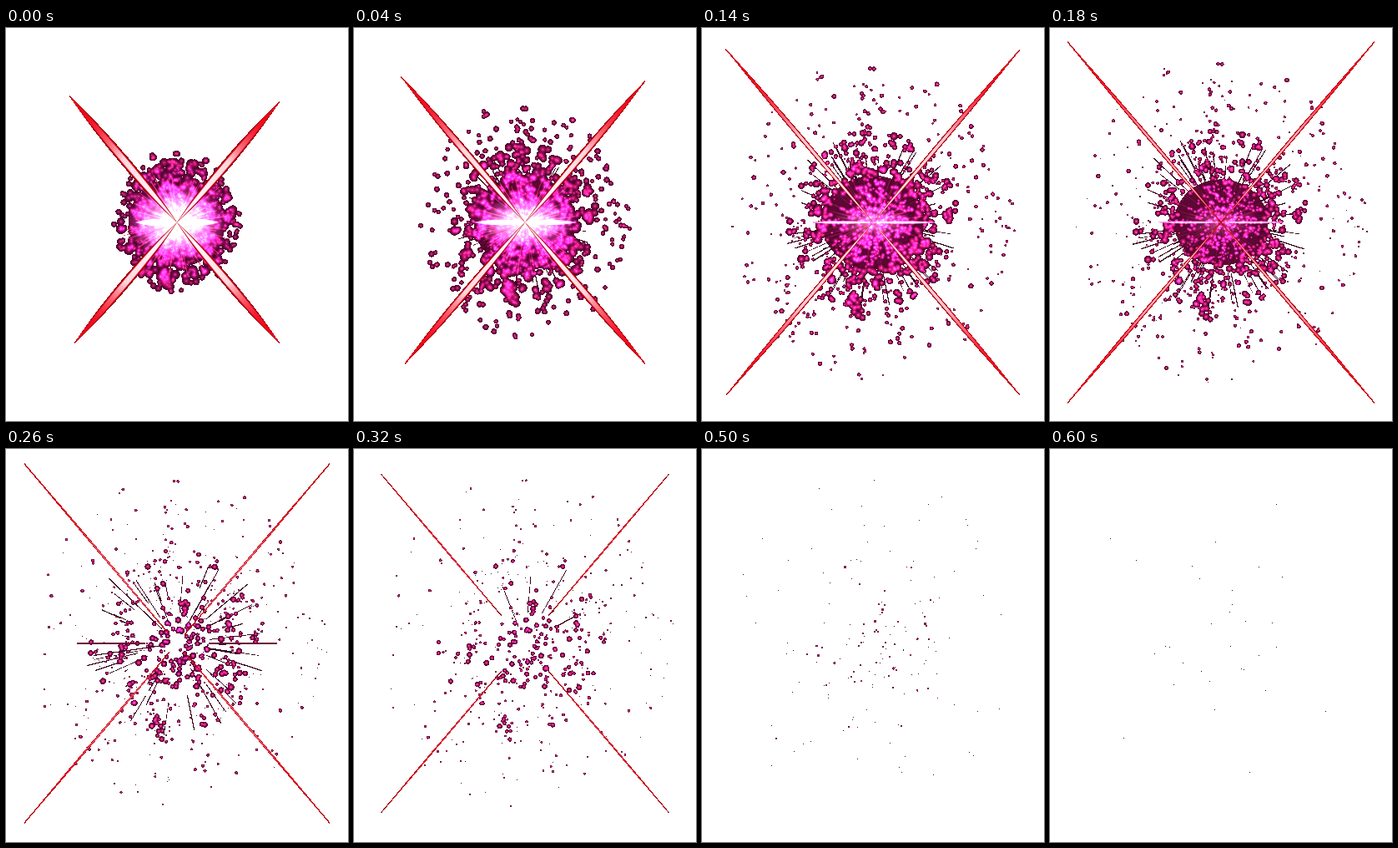
An HTML page with a canvas for the animation above (620 ms loop, 410 px wide and 471 px high).

```html
<!DOCTYPE html>
<html>
<head>
<meta charset="utf-8">
<style>
html, body { margin: 0; width: 100%; height: 100%; overflow: hidden; background: #fff; }
canvas { display: block; width: 410px; height: 471px; }
</style>
</head>
<body>
<canvas id="stage" width="410" height="471"></canvas>
<script>
const W = 410, H = 471, CX = 205, CY = 233, LOOP = 620, STEP = 20;
const ctx = document.getElementById('stage').getContext('2d', { willReadFrequently: true });

let seed = 20431;
function rnd() {
  seed = (seed + 0x6D2B79F5) | 0;
  let x = Math.imul(seed ^ (seed >>> 15), 1 | seed);
  x = (x + Math.imul(x ^ (x >>> 7), 61 | x)) ^ x;
  return ((x ^ (x >>> 14)) >>> 0) / 4294967296;
}
const range = (a, b) => a + (b - a) * rnd();
const clamp = v => Math.max(0, Math.min(1, v));

// Linear interpolation through [time, value] pairs
function track(keys, t) {
  if (t <= keys[0][0]) return keys[0][1];
  for (let i = 1; i < keys.length; i++) {
    const [t0, a] = keys[i - 1], [t1, b] = keys[i];
    if (t <= t1) return a + (b - a) * (t - t0) / (t1 - t0);
  }
  return keys[keys.length - 1][1];
}

function sprite(stops) {
  const c = document.createElement('canvas');
  c.width = c.height = 32;
  const g = c.getContext('2d');
  const grad = g.createRadialGradient(16, 16, 0, 16, 16, 16);
  stops.forEach(([p, col]) => grad.addColorStop(p, col));
  g.fillStyle = grad;
  g.beginPath();
  g.arc(16, 16, 16, 0, 7);
  g.fill();
  return c;
}
const disc = sprite([[0, '#580632'], [1, '#4a0428']]);
const cool = sprite([[0, 'rgba(255,95,190,1)'], [0.3, 'rgba(200,38,125,.7)'],
  [0.65, 'rgba(140,15,85,.4)'], [1, 'rgba(90,0,45,0)']]);
const hot = sprite([[0, 'rgba(255,150,245,1)'], [0.25, 'rgba(230,45,190,.7)'],
  [0.6, 'rgba(160,15,115,.32)'], [1, 'rgba(110,0,70,0)']]);

// Particles come in small clumps; lag is the share of the way still to go at the start
const parts = [];
function scatter(count, clump, o) {
  let made = 0;
  while (made < count) {
    const a = range(0, Math.PI * 2), r = o.radius();
    const n = Math.min(count - made, 1 + Math.floor(clump * rnd() * rnd()));
    for (let i = 0; i < n; i++) {
      const j = i ? 6 : 0;
      parts.push({
        x: Math.cos(a) * r * 0.93 + range(-j, j),
        y: Math.sin(a) * r * 1.03 + range(-j, j),
        size: o.size(), life: o.life(), power: o.power, lag: o.lag
      });
    }
    made += n;
  }
}
const longLife = () => 220 + 400 * rnd() ** 2;
scatter(300, 3, { radius: () => 76 * rnd() ** 0.7, size: () => range(9, 13),
  life: () => range(215, 262), power: 3, lag: 0.35 });
scatter(600, 5, { radius: () => 14 + 100 * rnd() ** 1.1, size: () => range(8, 12),
  life: longLife, power: 1.5, lag: 0.35 });
scatter(420, 2.6, { radius: () => 70 + 125 * rnd() ** 1.4, size: () => range(5.5, 8.5),
  life: longLife, power: 1, lag: 0.58 });

const rays = Array.from({ length: 90 }, () => ({
  a: range(0, Math.PI * 2), from: range(20, 80), to: range(60, 115),
  end: range(220, 330), w: range(0.5, 1.1)
}));

const spread = (t, lag) => 1 - lag * Math.exp(-t / 62);

function lens(x0, x1, half, fill) {
  const a = x0 + (x1 - x0) * 0.28, b = x0 + (x1 - x0) * 0.68, h = half * 1.33;
  ctx.fillStyle = fill;
  ctx.beginPath();
  ctx.moveTo(x0, 0);
  ctx.bezierCurveTo(a, -h, b, -h, x1, 0);
  ctx.bezierCurveTo(b, h, a, h, x0, 0);
  ctx.fill();
}

function line(x0, x1, width, color) {
  ctx.strokeStyle = color;
  ctx.lineWidth = width;
  ctx.beginPath();
  ctx.moveTo(x0, 0);
  ctx.lineTo(x1, 0);
  ctx.stroke();
}

function turned(angle, draw) {
  ctx.save();
  ctx.translate(CX, CY);
  ctx.rotate(angle);
  draw();
  ctx.restore();
}

function drawBase(t) {
  const r = track([[0, 58], [100, 66], [180, 56], [240, 0]], t);
  ctx.fillStyle = '#5c0834';
  ctx.beginPath();
  ctx.ellipse(CX, CY, r, r * 0.92, 0, 0, 7);
  ctx.fill();
  const k = spread(t, 0.5);
  for (const s of rays) {
    if (t < s.end) turned(s.a, () => line(s.from * k, s.to * k, s.w, '#3a0420'));
  }
}

function drawParts(t) {
  const live = [];
  for (const p of parts) {
    if (t >= p.life) continue;
    const k = spread(t, p.lag);
    const x = CX + p.x * k, y = CY + p.y * k;
    const d = p.size * (1 - (t / p.life) ** p.power);
    if (d < 2.6) {
      const s = Math.max(1, Math.round(d));
      ctx.fillStyle = `rgb(${50 + 32 * d},${8 + 8 * d},${30 + 20 * d})`;
      ctx.fillRect(Math.round(x), Math.round(y), s, s);
    } else {
      ctx.drawImage(disc, x - d / 2, y - d / 2, d, d);
      live.push([x, y, d * 0.94]);
    }
  }
  ctx.globalCompositeOperation = 'lighter';
  ctx.globalAlpha = 0.55 + 0.4 * clamp(t / 120);
  for (const [x, y, d] of live) {
    const near = Math.hypot(x - CX, y - CY) < 68 - t * 0.12;
    ctx.drawImage(near ? hot : cool, x - d / 2, y - d / 2, d, d);
  }
  ctx.globalAlpha = 1;
  ctx.globalCompositeOperation = 'source-over';
}

function drawCore(t) {
  ctx.globalCompositeOperation = 'lighter';
  const fade = clamp(1 - t / 240);
  for (const s of rays) {
    if (fade) turned(s.a, () => line(4, s.to * 0.6, s.w, `rgba(255,70,110,${0.5 * fade})`));
  }
  const power = track([[0, 1], [40, 0.85], [100, 0.4], [180, 0.15], [230, 0]], t);
  if (power > 0) {
    ctx.save();
    ctx.translate(CX, CY);
    ctx.scale(track([[0, 60], [40, 62], [100, 56], [180, 45]], t),
      track([[0, 46], [40, 32], [100, 24], [180, 22]], t));
    const g = ctx.createRadialGradient(0, 0, 0, 0, 0, 1);
    g.addColorStop(0, `rgba(255,255,255,${power})`);
    g.addColorStop(0.45, `rgba(255,220,255,${power * 0.7})`);
    g.addColorStop(1, 'rgba(255,100,255,0)');
    ctx.fillStyle = g;
    ctx.fillRect(-1, -1, 2, 2);
    ctx.restore();
  }
  ctx.globalCompositeOperation = 'source-over';
}

// Flat flare along the horizontal axis
function drawFlare(t) {
  const len = track([[0, 50], [40, 62], [100, 74], [180, 84], [260, 120]], t);
  const glow = track([[0, 1], [100, 0.85], [180, 0.6], [230, 0]], t);
  for (const a of [0, Math.PI]) {
    turned(a, () => {
      if (t > 180 && t < 320) {
        const start = track([[180, 10], [260, 38], [320, 85]], t);
        lens(start, len, 1.6 * (1 - (t - 180) / 150), '#5c0830');
        line(start, len, 0.8, '#7a1040');
      }
      if (glow > 0) {
        ctx.globalCompositeOperation = 'lighter';
        const half = track([[0, 4], [40, 3.2], [100, 2.2], [180, 1.4]], t);
        lens(0, len, half, `rgba(255,160,235,${glow})`);
        lens(0, len * 0.9, half * 0.5, `rgba(255,255,255,${glow * 0.7})`);
      }
    });
  }
}

const REACH = [[0, 123], [40, 144], [100, 167], [180, 184], [260, 183], [420, 155], [500, 107]];
const ROOT = [[0, 0], [200, 0], [260, 9], [420, 60], [500, 105]];
const GIRTH = [[0, 5.6], [40, 4.6], [100, 3.5], [180, 2.2], [260, 1.1], [420, 0.3], [500, 0]];

function drawBeams(t) {
  if (t >= 500) return;
  const half = track(GIRTH, t), root = track(ROOT, t) * 1.545;
  const age = clamp((t - 240) / 180);
  const tone = `rgb(${190 - 105 * age},${8 * age},${15 * age + 8})`;
  const shine = clamp(1.35 - t / 320);
  for (const [sx, sy] of [[-1, -1], [1, -1], [-1, 1], [1, 1]]) {
    const extra = sx < 0 && sy < 0 ? Math.max(0, 6 - t / 30) : 0;
    const tip = (track(REACH, t) + extra) * 1.545;
    turned(Math.atan2(sy * 1.176, sx), () => {
      line(t < 160 ? tip * 0.5 : root, tip, t < 300 ? 1.2 : 1, tone);
      if (half < 0.6) return;
      lens(root, tip, half, '#8a0010');
      lens(root, tip, half * 0.78, '#f00014');
      const g = ctx.createLinearGradient(root, 0, tip, 0);
      g.addColorStop(0, `rgba(255,${t < 160 ? '225,240' : '90,120'},${shine})`);
      g.addColorStop(0.2, `rgba(255,245,248,${shine})`);
      g.addColorStop(0.5, `rgba(255,215,222,${shine})`);
      g.addColorStop(0.9, 'rgba(255,20,40,0)');
      lens(root, tip, half * (t < 160 ? 0.6 : 0.5), g);
    });
  }
}

// Give every shape a hard, unblended edge
function harden() {
  const img = ctx.getImageData(0, 0, W, H), px = img.data;
  for (let i = 3; i < px.length; i += 4) px[i] = px[i] < 95 ? 0 : 255;
  ctx.putImageData(img, 0, 0);
}

function draw(t) {
  ctx.clearRect(0, 0, W, H);
  drawBase(t);
  drawParts(t);
  drawCore(t);
  drawFlare(t);
  drawBeams(t);
  harden();
}

let last = -1;
function tick() {
  const t = Math.floor(performance.now() % LOOP / STEP) * STEP;
  if (t !== last) draw(last = t);
  requestAnimationFrame(tick);
}
tick();
</script>
</body>
</html>
```
